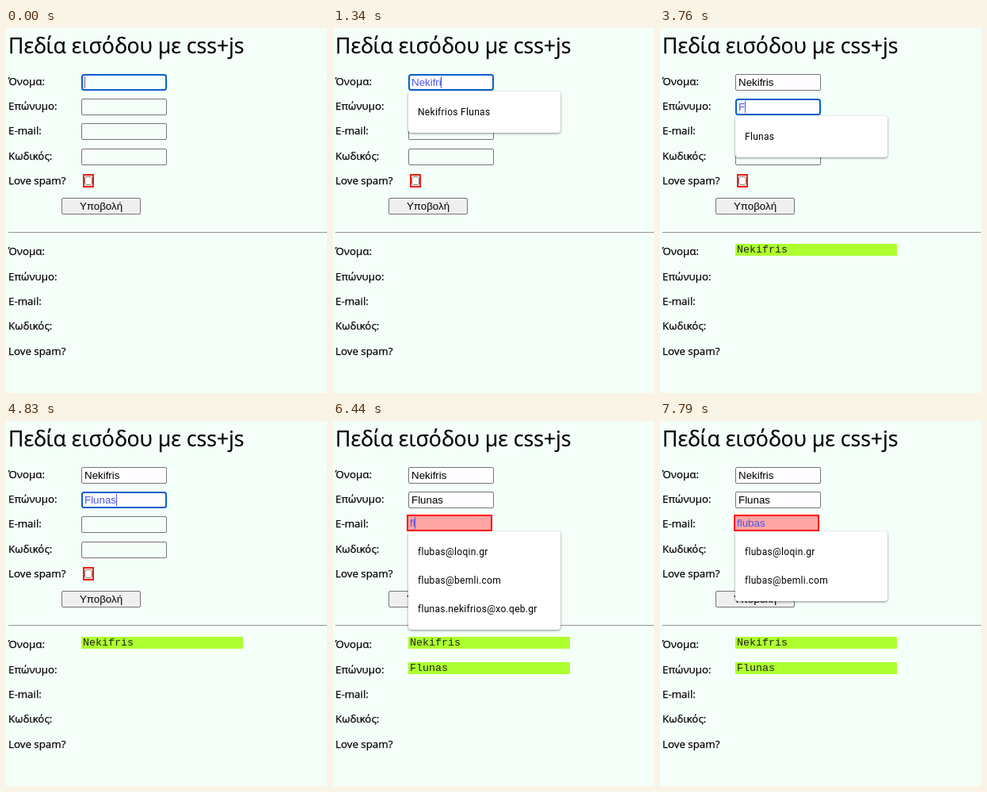
Animation of 405x460 px, one loop 8000 ms. Source, as an HTML page:

```html
<!DOCTYPE html>
<html lang="el">
<head>
<meta charset="utf-8">
<title>Πεδία εισόδου</title>
<style>
  html, body { margin: 0; width: 100%; height: 100%; overflow: hidden; background: #f5fffa; }
  svg { display: block; width: 405px; height: 460px; }
  text { white-space: pre; }
  .page { font: 13.333px "Open Sans", "Noto Sans", sans-serif; stroke: #000; stroke-width: .25px; }
  .title { font-size: 26.667px; }
  .field { font: 13.333px "Liberation Sans", Arial, sans-serif; }
  .result { font: 13.333px "Liberation Mono", "Courier New", monospace; fill: #222; }
  .option { font: 12px Roboto, sans-serif; letter-spacing: .3px; }
  .box { fill: #f5fffa; stroke: #767676; }
  .box.filled { fill: #fffdff; }
  .box.focus { stroke: #0a5fcb; stroke-width: 2; }
  .box.invalid { fill: #ffa5a5; stroke: #f00; stroke-width: 2; }
  .typing { fill: #4b55e6; }
  .popup { fill: #fff; filter: drop-shadow(0 1px 1.5px rgba(0, 0, 0, .45)); }
</style>
</head>
<body>
<svg id="stage" viewBox="0 0 405 460" xmlns="http://www.w3.org/2000/svg">
  <text class="page title" x="3" y="32">Πεδία εισόδου με css+js</text>
  <g id="labels"></g>
  <g id="fields"></g>
  <rect x="98" y="185" width="12" height="15" fill="#f5fffa" stroke="#ee1c10" stroke-width="2"/>
  <rect x="99.5" y="187.5" width="9" height="10" rx="2.5" fill="#fff" stroke="#808080"/>
  <rect x="70.5" y="214.5" width="99" height="20" rx="1.5" fill="#efefef" stroke="#767676"/>
  <text class="field" x="120" y="229" text-anchor="middle">Υποβολή</text>
  <rect x="3" y="257" width="402" height="1" fill="#9a9a9a"/>
  <rect x="3" y="258" width="402" height="1" fill="#eee"/>
  <g id="results"></g>
  <rect id="caret" width="1" height="15"/>
  <g id="popup">
    <rect class="popup" x="95" width="192" rx="4"/>
    <text class="option" x="107"></text>
    <text class="option" x="107"></text>
    <text class="option" x="107"></text>
  </g>
</svg>
<script>
const LOOP = 8000;
const PITCH = 31.34;
const labels = ['Όνομα:', 'Επώνυμο:', 'E-mail:', 'Κωδικός:', 'Love spam?'];
const rowY = (top, i) => Math.floor(top + i * PITCH);
const tops = [0, 1, 2, 3].map(i => rowY(58, i));
const first = 'Nekifris', last = 'Flunas', user = 'flubas';
const full = ['Nekifrios ' + last];
const mails = [user + '@loqin.gr', user + '@bemli.com', 'flunas.nekifrios@xo.qeb.gr'];

// start time, active row, letters typed, caret on, suggestions
const steps = [
  [0, 0, 0, 1, []],
  [270, 0, 1, 1, full],
  [530, 0, 3, 1, full],
  [800, 0, 4, 1, full],
  [1070, 0, 6, 1, full],
  [1340, 0, 7, 1, full],
  [1610, 0, 8, 1, []],
  [2150, 1, 0, 1, []],
  [2690, 1, 0, 0, []],
  [3220, 1, 0, 1, []],
  [3760, 1, 1, 1, [last]],
  [4030, 1, 2, 1, [last]],
  [4300, 1, 3, 1, [last]],
  [4560, 1, 5, 1, [last]],
  [4830, 1, 6, 1, []],
  [5370, 2, 0, 1, []],
  [5640, 2, 0, 0, []],
  [6180, 2, 0, 1, []],
  [6440, 2, 2, 1, mails],
  [6980, 2, 4, 1, mails.slice(0, 2)],
  [7250, 2, 5, 1, mails.slice(0, 2)],
  [7520, 2, 6, 1, mails.slice(0, 2)],
  [7790, 2, 6, 0, mails.slice(0, 2)]
];
const values = [first, last, user, ''];

const $ = id => document.getElementById(id);

function set(el, attrs) {
  for (const key in attrs) el.setAttribute(key, attrs[key]);
  return el;
}

function add(parent, tag, attrs, text = '') {
  const el = document.createElementNS('http://www.w3.org/2000/svg', tag);
  el.textContent = text;
  return parent.appendChild(set(el, attrs));
}

labels.forEach((label, i) => {
  for (const top of [72, 286.67]) {
    add($('labels'), 'text', { class: 'page', x: 3, y: rowY(top, i) }, label);
  }
});

const fields = tops.map(() => ({
  box: add($('fields'), 'rect', {}),
  text: add($('fields'), 'text', {})
}));

const results = [0, 1].map(i => {
  const y = rowY(272.67, i);
  const g = add($('results'), 'g', {});
  add(g, 'rect', { x: 95, y, width: 204, height: 15, fill: '#adff2f' });
  add(g, 'text', { class: 'result', x: 97, y: y + 11 }, values[i]);
  return g;
});

function drawField(i, row, typed) {
  const active = i === row;
  const invalid = active && i === 2 && typed > 0;
  const filled = i < row || (active && typed > 0);
  const shift = invalid ? 2 : 0;
  const x = 95 - shift, y = tops[i] - shift;
  const inset = active ? 1 : 0.5;
  const state = invalid ? 'invalid' : (filled ? 'filled ' : '') + (active ? 'focus' : '');
  set(fields[i].box, {
    class: 'box ' + state,
    x: x + inset, y: y + inset,
    width: 108 - 2 * inset, height: 21 - 2 * inset,
    rx: invalid ? 0 : active ? 2.5 : 1.5
  });
  const text = fields[i].text;
  set(text, { class: active ? 'field typing' : 'field', x: x + 4, y: y + 15 });
  text.textContent = i > row ? '' : active ? values[i].slice(0, typed) : values[i];
  return { x: x + 4, y: y + 3, text };
}

function drawCaret(spot, typed, on) {
  const width = typed ? spot.text.getComputedTextLength() : 0;
  set($('caret'), {
    x: Math.floor(spot.x + width), y: spot.y,
    fill: typed ? '#4b55e6' : '#666677',
    visibility: on ? 'visible' : 'hidden'
  });
}

function drawPopup(row, options) {
  const [panel, ...lines] = $('popup').children;
  const top = [80, 111, 139][row];
  set($('popup'), { visibility: options.length ? 'visible' : 'hidden' });
  set(panel, { y: top, height: 16 + 36 * options.length });
  lines.forEach((line, i) => {
    set(line, { y: top + 30 + 36 * i });
    line.textContent = options[i] || '';
  });
}

let shown;
function draw(time) {
  const t = time % LOOP;
  const step = steps.findLast(s => s[0] <= t);
  if (step === shown) return;
  shown = step;
  const [, row, typed, on, options] = step;
  const spots = fields.map((_, i) => drawField(i, row, typed));
  results.forEach((g, i) => set(g, { visibility: i < row ? 'visible' : 'hidden' }));
  drawCaret(spots[row], typed, on);
  drawPopup(row, options);
}

const start = performance.now();
function loop(now) {
  draw(Math.max(0, now - start));
  requestAnimationFrame(loop);
}
loop(start);
</script>
</body>
</html>
```
